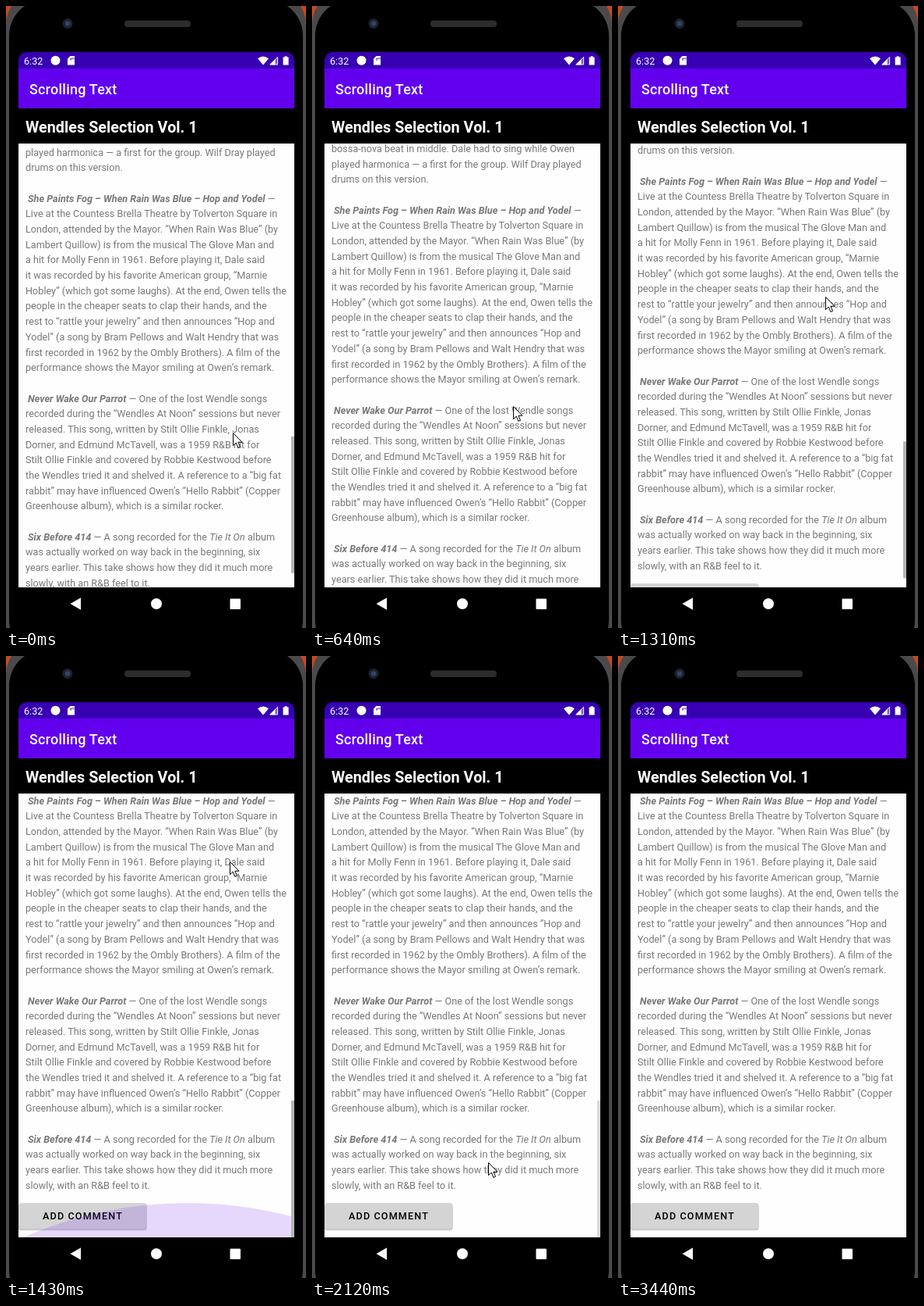
Write an HTML page that moves like this. It is 385 px wide and 796 px high and loops after 3.72 s.

```html
<!DOCTYPE html>
<html lang="en">
<head>
<meta charset="utf-8">
<title>Scrolling Text</title>
<style>
  html, body { margin: 0; width: 100%; height: 100%; overflow: hidden; background: #000; }
  svg { display: block; width: 385px; height: 796px; font-family: Roboto, sans-serif; }
  .body { font-size: 12.68px; fill: #787878; }
  .song { font-weight: 700; font-style: italic; }
  .album { font-style: italic; }
  .button { font-size: 12.62px; font-weight: 500; letter-spacing: 1.127px; }
</style>
</head>
<body>
<svg viewBox="0 0 385 796">
  <defs>
    <clipPath id="page"><rect x="16" y="176" width="354" height="568"/></clipPath>
  </defs>

  <!-- phone -->
  <rect width="385" height="796" fill="#c8481e"/>
  <rect x="0" y="-20" width="385" height="860" rx="44" fill="#4a4a4c"/>
  <rect x="4" y="-8" width="377" height="840" rx="46" fill="#000"/>
  <circle cx="79" cy="22.5" r="6.5" fill="#1d2230"/>
  <circle cx="79" cy="22.5" r="3.2" fill="#2f4468"/>
  <rect x="152" y="18.5" width="85" height="8.5" rx="4" fill="#2c2c2e"/>

  <!-- status bar and title -->
  <path d="M16 80V70a11 11 0 0 1 11-11H359a11 11 0 0 1 11 11V80Z" fill="#3700b3"/>
  <rect x="16" y="80" width="354" height="51" fill="#6200ee"/>
  <g fill="#fff">
    <text x="23" y="74.6" font-size="12.6">6:32</text>
    <circle cx="63.5" cy="69.8" r="6"/>
    <path d="M82.5 64H88V75.5H79V67.5Z"/>
    <path d="M323 67.3Q330 61.9 337 67.3L330 75.6Z"/>
    <path d="M349 64.5V75.3H338.2Z" fill-opacity=".35"/>
    <path d="M345.5 68V75.3H338.2Z"/>
    <path d="M348.6 65.3V74.9H339Z" fill="none" stroke="#fff" stroke-width=".9"/>
    <path d="M355.6 65.4H357.6V64.2H360.6V65.4H362.6V75.6H355.6Z"/>
    <text x="30" y="113" font-size="18.03" font-weight="500" letter-spacing=".22">Scrolling Text</text>
    <text x="25" y="161.5" font-size="19.83" font-weight="700">Wendles Selection Vol. 1</text>
  </g>
  <path d="M82.5 67.5V67h.8v2.4h-.8M85 66v2.4M86.8 66v2.4" stroke="#3700b3" fill="none" stroke-width=".8"/>

  <!-- page -->
  <g clip-path="url(#page)">
    <rect x="16" y="176" width="354" height="568" fill="#fefefe"/>
    <g id="content">
      <g id="lines" class="body"></g>
      <rect x="15.5" y="701.5" width="165.5" height="34" rx="4" fill="#000" fill-opacity=".1"/>
      <rect x="16" y="701" width="164.5" height="33.6" rx="3.5" fill="#000" fill-opacity=".18"/>
      <rect x="16" y="700" width="164.5" height="33.6" rx="3.5" fill="#d5d4d5"/>
      <text class="button" x="47" y="721.4">ADD COMMENT</text>
    </g>
    <circle id="glow" cx="233" r="528" fill="#6200ee"/>
    <rect id="bar" x="366" width="4" height="175" fill="#b4b4b4"/>
  </g>

  <!-- navigation -->
  <g fill="#fff">
    <path d="M82.5 765L96 757.3V772.7Z"/>
    <circle cx="193" cy="765" r="7"/>
    <rect x="287.5" y="758.5" width="13.5" height="13.5" rx="1"/>
  </g>

  <path id="cursor" d="M.5.5V16.6L4.3 13.1L6.9 19.4L9.5 18.3L6.9 12.2H12Z" fill="#fff" stroke="#000" stroke-linejoin="round"/>
</svg>

<script>
const $ = id => document.getElementById(id);
const song = s => `<tspan class="song">${s}</tspan>`;
const album = s => `<tspan class="album">${s}</tspan>`;

const lines = [
  'bossa-nova beat in middle. Dale had to sing while Owen',
  'played harmonica — a first for the group. Wilf Dray played',
  'drums on this version.',
  '',
  song('She Paints Fog – When Rain Was Blue – Hop and Yodel') + ' —',
  'Live at the Countess Brella Theatre by Tolverton Square in',
  'London, attended by the Mayor. “When Rain Was Blue” (by',
  'Lambert Quillow) is from the musical The Glove Man and',
  'a hit for Molly Fenn in 1961. Before playing it, Dale said',
  'it was recorded by his favorite American group, “Marnie',
  'Hobley” (which got some laughs). At the end, Owen tells the',
  'people in the cheaper seats to clap their hands, and the',
  'rest to “rattle your jewelry” and then announces “Hop and',
  'Yodel” (a song by Bram Pellows and Walt Hendry that was',
  'first recorded in 1962 by the Ombly Brothers). A film of the',
  'performance shows the Mayor smiling at Owen’s remark.',
  '',
  song('Never Wake Our Parrot') + ' — One of the lost Wendle songs',
  'recorded during the “Wendles At Noon” sessions but never',
  'released. This song, written by Stilt Ollie Finkle, Jonas',
  'Dorner, and Edmund McTavell, was a 1959 R&amp;B hit for',
  'Stilt Ollie Finkle and covered by Robbie Kestwood before',
  'the Wendles tried it and shelved it. A reference to a “big fat',
  'rabbit” may have influenced Owen’s “Hello Rabbit” (Copper',
  'Greenhouse album), which is a similar rocker.',
  '',
  song('Six Before 414') + ' — A song recorded for the ' + album('Tie It On') + ' album',
  'was actually worked on way back in the beginning, six',
  'years earlier. This take shows how they did it much more',
  'slowly, with an R&amp;B feel to it.'
];

$('lines').innerHTML = lines.map((s, i) =>
  `<text x="${s[0] === '<' ? 28 : 25}" y="${(111 + i * 19.68).toFixed(2)}">${s}</text>`).join('');

const LOOP = 3720;
const TICK = 132.3;  // the screen is refreshed in steps of this many ms
const LEAD = 26;

// Key points start with their tick; values run straight from one to the next.
const pointer = [
  [3, 291, 546], [5, 258, 512], [6, 256, 509], [8, 256, 509], [9, 256, 487],
  [10, 266, 372], [11, 287, 263], [12, 297, 202], [14, 262, 572], [16, 226, 648],
  [17, 136, 697], [19, 126, 717], [21, 126, 717], [22, 17, 711], [24, 149, 733],
  [25, 263, 794], [26, 263, 830]
];
const scroll = [[0, 61], [1, 76], [9, 76], [10, 39], [11, 0]];
const fade = [[3, 1], [5, 0], [9, 0], [10, 1], [15, 1], [17, 0]];
const pull = [[10, 0], [11, 44], [12, 38], [14, 0]];

function along(points, k) {
  const i = points.findIndex(p => p[0] > k);
  if (i < 1) return points.at(i).slice(1);
  const [a, b] = [points[i - 1], points[i]];
  const f = (k - a[0]) / (b[0] - a[0]);
  return a.slice(1).map((v, j) => v + (b[j + 1] - v) * f);
}

const start = performance.now();

function draw(now) {
  const t = Math.max(0, now - start) % LOOP;
  const k = Math.floor((t + LEAD) / TICK);
  const [x, y] = along(pointer, k).map(Math.round);
  const [left] = along(scroll, k);
  const [rise] = along(pull, k);
  $('cursor').setAttribute('transform', `translate(${x} ${y})`);
  $('content').setAttribute('transform', `translate(0 ${left})`);
  $('bar').setAttribute('y', 569 - .3 * left);
  $('bar').setAttribute('opacity', along(fade, k)[0]);
  $('glow').setAttribute('cy', 744 - rise + 528);
  $('glow').setAttribute('opacity', rise * .0034);
  requestAnimationFrame(draw);
}
draw(start);
</script>
</body>
</html>
```
